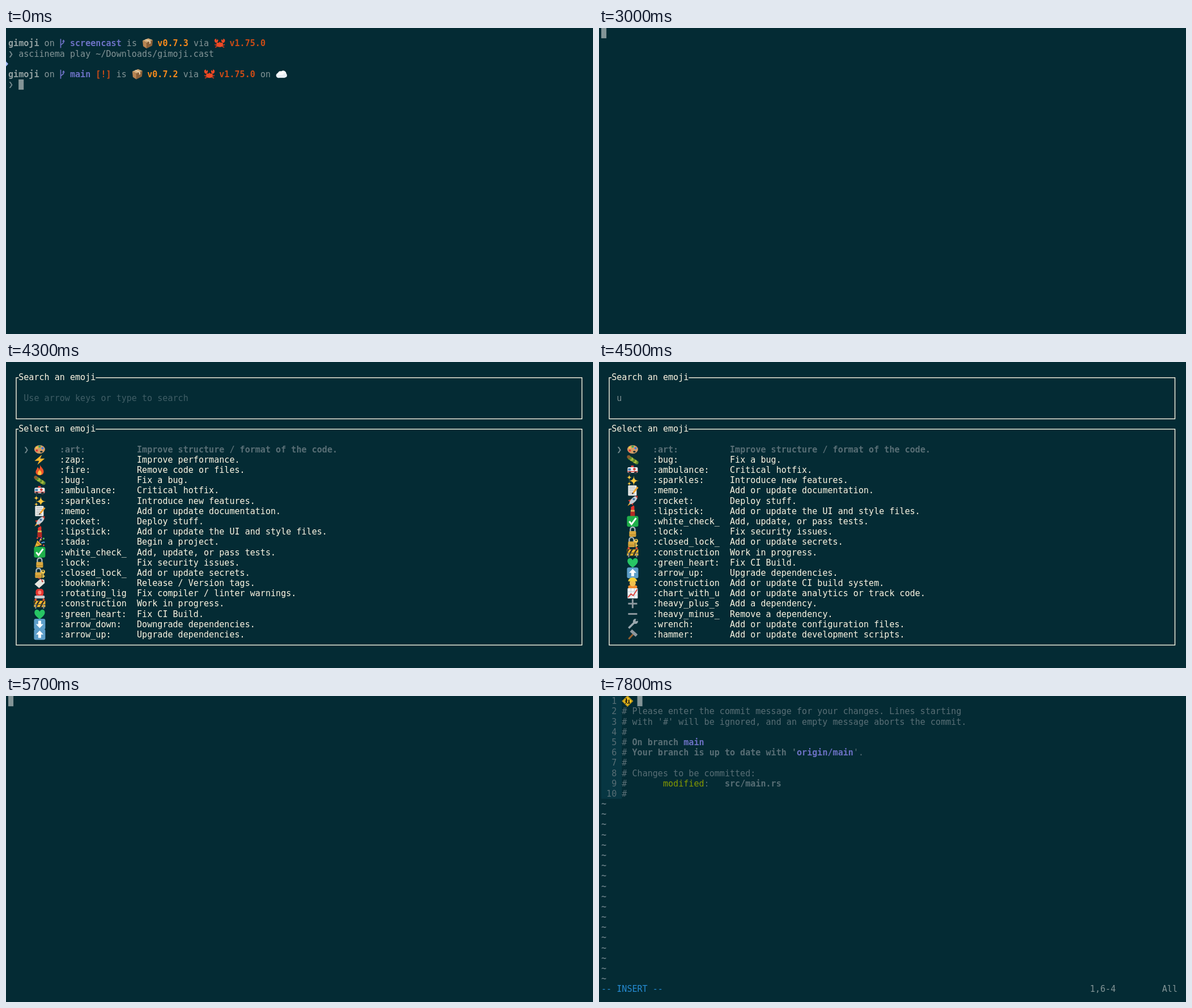
Animation, 1036 px wide and 541 px high, one loop 8 s. Source, as an HTML page with a canvas:

```html
<!DOCTYPE html>
<html lang="en">
<head>
<meta charset="utf-8">
<title>Picking an emoji for a commit</title>
<style>
html, body { margin: 0; width: 100%; height: 100%; overflow: hidden; background: #042b34; }
canvas { display: block; }
</style>
</head>
<body>
<canvas id="stage" width="1036" height="541"></canvas>
<script>
const ctx = document.getElementById('stage').getContext('2d');
const LOOP = 8000, CELL = 9.08, ROW = 18.18, LEFT = 4;
const BG = '#042b34', GRAY = '#839496', DIM = '#586e75', CREAM = '#fdf6e3',
  VIOLET = '#6c71c4', ORANGE = '#f98b1c', RUST = '#cb4b16';

const colX = col => LEFT + col * CELL;

// Drawing helpers
function bar(color, x, y, w, h, r = 0) {
  ctx.fillStyle = color;
  ctx.beginPath();
  ctx.roundRect(x, y, w, h, r);
  ctx.fill();
}
function disc(color, x, y, rx, ry = rx) {
  ctx.fillStyle = color;
  ctx.beginPath();
  ctx.ellipse(x, y, rx, ry, 0, 0, 2 * Math.PI);
  ctx.fill();
}
function shape(color, path) {
  ctx.fillStyle = color;
  ctx.fill(new Path2D(path));
}
function line(color, width, path) {
  ctx.strokeStyle = color;
  ctx.lineWidth = width;
  ctx.stroke(new Path2D(path));
}
function star(color, x, y, r) {
  shape(color, `M${x} ${y - r}Q${x} ${y} ${x + r} ${y}Q${x} ${y} ${x} ${y + r}` +
    `Q${x} ${y} ${x - r} ${y}Q${x} ${y} ${x} ${y - r}`);
}
function text(str, col, row, color = GRAY, bold = false) {
  ctx.font = `${bold ? 'bold ' : ''}15.08px "DejaVu Sans Mono", monospace`;
  ctx.fillStyle = color;
  ctx.fillText(str, colX(col), row * ROW + 14.3);
}
const cursor = (col, row, cells = 1) => bar(GRAY, colX(col), row * ROW, cells * CELL, ROW);

function padlock(x) {
  line('#a9b4ba', 2.4, `M${x - 4} 0V-4A4 4 0 0 1 ${x + 4}-4V0`);
  bar('#d9a93f', x - 6, -1, 12, 10, 1.5);
  bar('#b98829', x - 6, 5, 12, 1.5);
}
function arrowKey(direction) {
  bar('#5d9fca', -10, -9.5, 20, 19, 3);
  ctx.scale(1, direction);
  shape('#fff', 'M0 7L-6.500 0H-2.500V-6H2.500V0H6.500Z');
}

// Each icon is drawn around its centre, about 20 px wide
const icons = {
  package() {
    shape('#d5a873', 'M-9-5L1-9L9-6L-2-1Z');
    shape('#b98552', 'M-9-5L-2-1V9L-8 5Z');
    shape('#8d6139', 'M-2-1L9-6L8 4L-2 9Z');
    shape('#e8d3ae', 'M-5-6.500L-3-7.500L5-4V0L3 1V-3Z');
  },
  crab() {
    line('#d5381b', 1.6, 'M-4 4L-9 2M-4 5L-8 7M4 4L9 2M4 5L8 7M-4 0L-8-3M4 0L8-3');
    disc('#ee4a25', 0, 2, 6, 4.5);
    disc('#ee4a25', -6, -5, 3.2);
    disc('#ee4a25', 6, -5, 3.2);
    shape(BG, 'M-6-5L-6-9L-3-8ZM6-5L6-9L3-8Z');
    disc('#2a1510', -2, -2, 1);
    disc('#2a1510', 2, -2, 1);
  },
  cloud() {
    disc('#e9eff4', -5, 2, 4.5);
    disc('#fbfcfd', -2, -1, 4.5);
    disc('#fbfcfd', 3, -1, 5.5);
    disc('#e9eff4', 6, 2, 3.8);
    bar('#e9eff4', -5, 1, 11, 5.3);
  },
  art() {
    disc('#d59b66', 0, 0, 9.5, 7.5);
    disc(BG, 3, 4, 2.2, 1.5);
    disc('#e23b35', -5, 2, 2);
    disc('#f4cb3d', -5, -3, 2);
    disc('#3aa757', 0, -5, 2);
    disc('#3d7fe0', 5, -2, 2);
  },
  zap() { shape('#fdb52c', 'M4-9L-9 2H-1L-4 9L9-2H1Z'); },
  fire() {
    shape('#f0532a', 'M0-10C2-5 8-2 7 4C6 11-6 11-7 4C-7 0-4-2-4-5C-2-4-1-3-1-1C1-4 1-7 0-10Z');
    shape('#fdc544', 'M0 0C5 4 4 9 0 9C-4 9-5 4 0 0Z');
  },
  bug() {
    for (let i = 0; i < 5; i++) disc(i % 2 ? '#a6b73b' : '#5f8a2c', 7 - i * 3, 5 - i * 2, 3.3);
    disc('#8a5a2b', -7, -5, 3);
  },
  ambulance() {
    bar('#eef1f4', -9, -5, 18, 10, 2);
    bar('#4d86b8', -8, -3, 5, 4, 1);
    bar('#d63a32', -9, 2, 18, 1.6);
    bar('#d63a32', 2, -4, 2, 5);
    bar('#d63a32', 0.5, -2.5, 5, 2);
    bar('#e7463c', -3, -8, 5, 3, 1);
    disc('#30363c', -5, 5, 2.5);
    disc('#30363c', 5, 5, 2.5);
  },
  sparkles() {
    star('#fdc63c', 2, 1, 9);
    star('#fdc63c', -6, -5, 5);
    star('#fdc63c', -6, 6, 4);
  },
  memo() {
    bar('#f0f0ed', -8, -9, 15, 18, 1);
    line('#9da6aa', 1, 'M-6-6H5M-6-3H5M-6 0H2M-6 3H0M-6 6H4');
    line('#f0a22e', 3, 'M9-6L1 4');
    line('#4b3a2c', 2, 'M1 4L-1 6');
  },
  rocket() {
    shape('#d5382f', 'M-8-1L-2-3L2 2L0 8ZM3-8L9-9L8-3Z');
    shape('#c5ced4', 'M5-8C0-7-5-1-6 4L-4 6C1 5 7 0 8-5Z');
    disc('#3f77a8', 2, -3, 2);
    shape('#fbaa31', 'M-6 4L-9 9L-4 6Z');
  },
  lipstick() {
    shape('#e7352c', 'M-3-1V-7L2-10L3-8V-1Z');
    bar('#d9b154', -3.5, -2, 7, 4);
    bar('#b42a24', -4, 1, 8, 9, 1);
  },
  tada() {
    shape('#f0b83a', 'M-9 9L-4-3L4 5Z');
    shape('#c98b24', 'M-7 5L-3 7L-5 8L-8 7ZM-5-1L2 5L0 6L-6 2Z');
    line('#d54ab2', 1.6, 'M0 0Q0-5 4-8');
    line('#52a8e8', 1.6, 'M3 2Q7-1 9 1');
    disc('#e8463b', -4, -7, 1.5);
    disc('#58b957', 7, -6, 1.6);
    disc('#f4cb3d', 2, -4, 1.3);
    disc('#e8463b', 7, 6, 1.4);
  },
  white_check_mark() {
    bar('#20b04b', -10, -9.5, 20, 19, 3);
    line('#fff', 3, 'M-6 0L-2 5L6-6');
  },
  lock() { padlock(0); },
  closed_lock_with_key() {
    padlock(-2);
    disc('#f3c851', 6, -2, 3.5);
    disc(BG, 6, -3, 1.2);
    line('#f3c851', 2.2, 'M6 1V9M6 6H9');
  },
  bookmark() {
    shape('#e5e5df', 'M-9 2L1-7L8-6L9 0L-1 9Z');
    disc('#b7544e', 5, -3, 1.6);
    line('#d4453d', 1.4, 'M5-3Q3-8-3-9');
  },
  rotating_light() {
    bar('#e3342f', -7, -8, 14, 13, 5);
    bar('#ff8d7e', -3, -5, 6, 7, 3);
    bar('#c6ccd1', -9, 4, 18, 5, 2);
  },
  construction() {
    bar('#f5b72c', -10, -5, 20, 6);
    shape('#2c2b29', 'M-9-5H-6L-9 1H-10V-2ZM-2-5H1L-3 1H-6ZM6-5H9L5 1H2Z');
    bar('#f5b72c', -10, 2, 20, 4);
    shape('#2c2b29', 'M-6 2H-3L-5 6H-8ZM2 2H5L3 6H0Z');
    bar('#8a8f91', -8, 1, 2, 8);
    bar('#8a8f91', 6, 1, 2, 8);
    disc('#e8532f', -7, -7, 2);
    disc('#e8532f', 7, -7, 2);
  },
  green_heart() { shape('#27c564', 'M0 9C-7 4-10 0-9-4C-8-9-2-9 0-4C2-9 8-9 9-4C10 0 7 4 0 9Z'); },
  arrow_down() { arrowKey(1); },
  arrow_up() { arrowKey(-1); },
  construction_worker() {
    bar('#f08a2c', -8, 4, 16, 6, 3);
    disc('#f2c14e', 0, 0, 5.5, 6);
    shape('#f7cf3a', 'M-8-3C-7-12 7-12 8-3Z');
  },
  chart_with_upwards_trend() {
    bar('#f2f4f5', -9, -9, 18, 18, 1);
    line('#a9c3d1', 0.7, 'M-9-3H9M-9 3H9M-3-9V9M3-9V9');
    line('#dc3b34', 1.8, 'M-8 7L-3 1L1 4L8-7');
  },
  heavy_plus_sign() {
    bar('#8d989e', -8, -1.5, 16, 3);
    bar('#8d989e', -1.5, -8, 3, 16);
  },
  heavy_minus_sign() { bar('#8d989e', -8, -1.5, 16, 3); },
  wrench() {
    line('#9aa7ae', 3.6, 'M-7 7L4-4');
    disc('#9aa7ae', 5, -5, 4.5);
    shape(BG, 'M5-5L6-10L10-6Z');
  },
  hammer() {
    line('#96602f', 3, 'M-7 8L3-3');
    line('#8c979e', 5.5, 'M-3-7L7 2');
  },
  children_crossing() {
    shape('#f8c51e', 'M0-10L10 0L0 10L-10 0Z');
    line('#4a3b0a', 0.7, 'M0-8.500L8.500 0L0 8.500L-8.500 0Z');
    disc('#17150d', -2, -3.5, 1.4);
    disc('#17150d', 2.5, -1.5, 1.2);
    line('#17150d', 2, 'M-2-2V2M2.500 0V3');
    line('#17150d', 1.1, 'M-2 1L-4 5M-2 1L0 5M-5 0L0-1M2.500 2L1 5M2.500 2L4 5');
  },
  busts_in_silhouette() {
    for (const x of [4, -3]) {
      disc('#5b7f9c', x, -3, 3.8, 4.5);
      bar('#476b87', x - 6, 2, 12, 6, 3);
    }
  },
  necktie() {
    shape('#eaf0f4', 'M-9 9V-6L0-9L9-6V9Z');
    shape('#3c73ad', 'M-2-7H2L1-4L3 5L0 9L-3 5L-1-4Z');
  },
};
function icon(name, col, row) {
  ctx.save();
  ctx.translate(colX(col) + 10, (row + 0.5) * ROW);
  icons[name]();
  ctx.restore();
}

const emojis = Object.entries({
  art: 'Improve structure / format of the code.',
  zap: 'Improve performance.',
  fire: 'Remove code or files.',
  bug: 'Fix a bug.',
  ambulance: 'Critical hotfix.',
  sparkles: 'Introduce new features.',
  memo: 'Add or update documentation.',
  rocket: 'Deploy stuff.',
  lipstick: 'Add or update the UI and style files.',
  tada: 'Begin a project.',
  white_check_mark: 'Add, update, or pass tests.',
  lock: 'Fix security issues.',
  closed_lock_with_key: 'Add or update secrets.',
  bookmark: 'Release / Version tags.',
  rotating_light: 'Fix compiler / linter warnings.',
  construction: 'Work in progress.',
  green_heart: 'Fix CI Build.',
  arrow_down: 'Downgrade dependencies.',
  arrow_up: 'Upgrade dependencies.',
  construction_worker: 'Add or update CI build system.',
  chart_with_upwards_trend: 'Add or update analytics or track code.',
  heavy_plus_sign: 'Add a dependency.',
  heavy_minus_sign: 'Remove a dependency.',
  wrench: 'Add or update configuration files.',
  hammer: 'Add or update development scripts.',
  children_crossing: 'Improve user experience / usability.',
  busts_in_silhouette: 'Add or update contributor(s).',
  necktie: 'Add or update business logic.',
});

// Number of steps, one every `every` ms from `start`, done by time t
const steps = (t, start, every, max) =>
  Math.max(0, Math.min(max, Math.floor((t - start) / every) + 1));

function prompt(row, branch, dirty, version) {
  let col = 12 + branch.length + 1;
  text('gimoji', 0, row, '#93a1a1', true);
  text('on', 7, row);
  const y = row * ROW;
  line(VIOLET, 1.7, `M96.500 ${y + 1}V${y + 17}M101.500 ${y + 4}V${y + 8}L96.500 ${y + 12}`);
  shape(VIOLET, `M99 ${y + 6}L101.500 ${y + 2}L104 ${y + 6}Z`);
  text(branch, 12, row, VIOLET, true);
  if (dirty) {
    text('[!]', col, row, RUST, true);
    col += 4;
  }
  text('is', col, row);
  icon('package', col + 3, row);
  text(version, col + 6, row, ORANGE, true);
  text('via', col + 13, row);
  icon('crab', col + 17, row);
  text('v1.75.0', col + 20, row, RUST, true);
  return col + 28;
}

function drawShell(t) {
  prompt(1, 'screencast', false, 'v0.7.3');
  text('❯', 0, 2, '#71868b');
  text('asciinema play ~/Downloads/gimoji.cast', 2, 2);
  shape('#a3bcfa', 'M0 59L4 63.500L0 68Z');
  const end = prompt(4, 'main', true, 'v0.7.2');
  text('on', end, 4);
  icon('cloud', end + 3, 4);
  const typed = steps(t, 100, 200, 4) + steps(t, 1000, 100, 9);
  text('❯', 0, 5, '#71868b');
  text('git commit -a'.slice(0, typed), 2, 5);
  cursor(2 + typed, 5);
}

function panel(title, top, bottom) {
  const y = top * ROW + 9.6;
  ctx.strokeStyle = CREAM;
  ctx.lineWidth = 1.4;
  ctx.strokeRect(18, y, 998.5, (bottom - top) * ROW);
  bar(BG, colX(2), y - 2, title.length * CELL, 4);
  text(title, 2, top, CREAM);
}

function drawPicker(t) {
  const query = 'user'.slice(0, steps(t, 4500, 100, 4));
  panel('Search an emoji', 1, 5);
  panel('Select an emoji', 6, 27);
  if (query) text(query, 3, 3, '#7c8e91');
  else text('Use arrow keys or type to search', 3, 3, '#405e66');
  text('❯', 3, 8, '#71868b');
  emojis
    .filter(([name, about]) => name.includes(query) || about.includes(query))
    .slice(0, 19)
    .forEach(([name, about], i) => {
      const color = i ? CREAM : DIM;
      icon(name, 5, 8 + i);
      text(`:${name}:`.slice(0, 13), 10, 8 + i, color, !i);
      text(about, 25, 8 + i, color, !i);
    });
}

function drawEditor(t) {
  const insert = t >= 7800;
  const [row, col, position] =
    insert ? [0, 7, '1,6-4'] :
    t >= 7500 ? [0, 6, '1,5-3'] :
    t >= 7300 ? [0, 4, '1,1'] :
    t >= 7100 ? [1, 4, '2,1'] : [2, 4, '3,1'];

  bar('#073642', LEFT, 0, 4 * CELL, 10 * ROW);
  cursor(col, row, row === 0 && col === 4 ? 2 : 1);
  for (let i = 0; i < 10; i++) {
    text(String(i + 1).padStart(3), 0, i, DIM);
    if (i) text('#', 4, i, i === row ? BG : DIM);
  }
  icon('children_crossing', 4, 0);
  text('Please enter the commit message for your changes. Lines starting', 6, 1, DIM);
  text("with '#' will be ignored, and an empty message aborts the commit.", 6, 2, DIM);
  text('On branch', 6, 4, DIM, true);
  text('main', 16, 4, VIOLET, true);
  text("Your branch is up to date with '", 6, 5, DIM, true);
  text('origin/main', 38, 5, VIOLET, true);
  text("'.", 49, 5, DIM);
  text('Changes to be committed:', 6, 7, DIM);
  text('modified', 12, 8, '#859900');
  text(':', 20, 8, DIM);
  text('src/main.rs', 24, 8, DIM, true);
  for (let i = 10; i < 28; i++) text('~', 0, i, '#657b83', true);

  if (insert) text('-- INSERT --', 0, 28, '#268bd2');
  else text('"~/checkout/quorvi/gimoji/.git/COMMIT_EDITMSG" 10L, 265B', 0, 28);
  text(position, 95, 28);
  text('All', 109, 28);
}

const drawBlank = () => cursor(0, 0);

function frame() {
  const t = performance.now() % LOOP;
  bar(BG, 0, 0, 1036, 541);
  const draw = t < 3000 ? drawShell : t < 3100 ? drawBlank :
    t < 5700 ? drawPicker : t < 5800 ? drawBlank : drawEditor;
  draw(t);
  requestAnimationFrame(frame);
}
frame();
</script>
</body>
</html>
```
